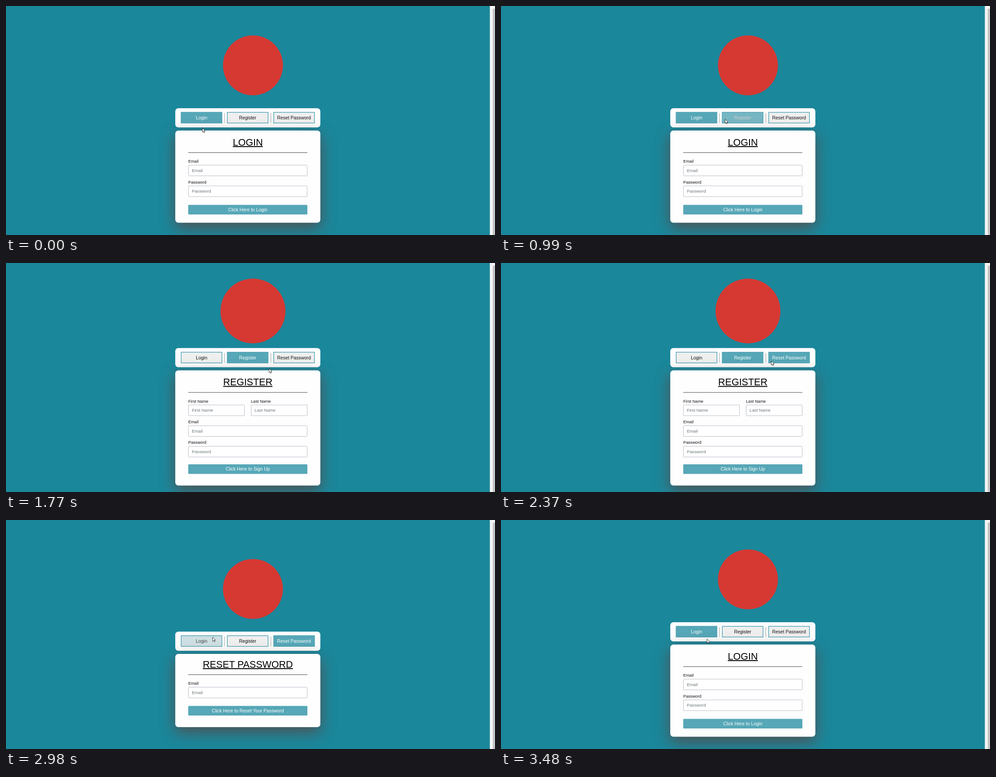
Write an HTML page that moves like this. It is 1092 px wide and 513 px high and loops after 3870 ms.

```html
<!DOCTYPE html>
<html lang="en">
<head>
<meta charset="utf-8">
<title>Login form</title>
<style>
  html, body { margin: 0; width: 100%; height: 100%; overflow: hidden; }
  body { position: relative; background: #1b879b; color: #111;
         font: 20.7px "Liberation Sans", Arial, sans-serif; }
  div, svg { position: absolute; box-sizing: border-box; white-space: nowrap; }
  /* Laid out at double size, so that half pixels stay exact. */
  #stage { left: 0; top: 0; width: 2184px; height: 1026px;
           transform: scale(.5); transform-origin: 0 0; }
  .scene { inset: 0; }
  .logo { border-radius: 50%; background: #d63832; }
  .panel { left: 756px; width: 648px; background: #fefefe; border-radius: 14px; }
  .nav { height: 86px; }
  .card { box-shadow: 0 22px 64px rgba(90, 70, 70, .85); }
  .tab { top: 17px; width: 185px; height: 51px; border: 3px solid #56a7b7;
         line-height: 46px; text-align: center; }
  .separator { top: 22px; width: 2px; height: 44px; background: #999; }
  .title { left: 0; width: 100%; font-size: 43px; line-height: 60px;
           text-align: center; text-decoration: underline; color: #000; }
  .rule { left: 58px; width: 532px; height: 2px; background: #444; }
  .label { font-size: 18.4px; line-height: 24px; }
  .field { height: 50px; padding-left: 14px; border: 2px solid #b9bcc9; border-radius: 3px;
           background: #fff; color: #6b7778; font-size: 19.4px; line-height: 45px; }
  .submit { left: 58px; width: 532px; height: 43px; border-radius: 3px;
            background: #56a7b7; color: #fff; line-height: 42px; text-align: center; }
  .track { left: 2161px; top: 0; width: 23px; height: 1026px; background: #f4f4f4; }
  .thumb { left: 13px; top: 12px; width: 10px; height: 1014px; background: #c4c4c4; }
  #cursor { left: 0; top: 0; overflow: visible; }
</style>
</head>
<body>
<div id="stage"></div>
<svg id="cursor" width="9" height="13">
  <path d="M.5 .5V9.6L2.6 7.7L4.1 11L5.6 10.3L4.2 7.2H7Z" fill="#fff" stroke="#111" stroke-width=".8"/>
</svg>
<script>
const LOOP = 3870;
const FADE = 200;
const CLICK_REGISTER = 1070, CLICK_RESET = 2410, CLICK_LOGIN = 3230;

// Row offsets are measured from the top of the card.
const scenes = [
  { top: 229, height: 206.5, logoY: 133, logoSize: 134, title: 'LOGIN', titleY: 26,
    fields: [['Email', 69], ['Password', 115.5]],
    submit: 'Click Here to Login', submitY: 166.5 },
  { top: 190.5, height: 258, logoY: 107.5, logoSize: 145, title: 'REGISTER', titleY: 26,
    fields: [['First Name', 69, 29, 126], ['Last Name', 69, 169, 126],
             ['Email', 115.5], ['Password', 161.5]],
    submit: 'Click Here to Sign Up', submitY: 210.5 },
  { top: 250, height: 164, logoY: 154.5, logoSize: 134, title: 'RESET PASSWORD', titleY: 23,
    fields: [['Email', 66]],
    submit: 'Click Here to Reset Your Password', submitY: 116.5 }
];

// Each fade is a start time and the level it leads to.
const tabs = [
  { text: 'Login', x: 12.5, start: 1, fades: [[CLICK_REGISTER, 0], [2960, 1]] },
  { text: 'Register', x: 115.5, start: 0, fades: [[890, 1], [CLICK_RESET, 0]] },
  { text: 'Reset Password', x: 219, start: 0, fades: [[1990, 1], [CLICK_LOGIN, 0]] }
];

// time, x, y of the pointer tip
const pointerPath = [
  [0, 438, 273], [460, 438, 273], [700, 466, 268], [900, 495, 256], [960, 500, 253],
  [1290, 500, 253], [1490, 546, 252], [1770, 587, 236], [1990, 600, 222], [2070, 603, 219],
  [2430, 603, 219], [2600, 522, 211], [2800, 488, 237], [2980, 461, 262], [3110, 459.5, 266],
  [LOOP, 459.5, 266]
];

function box(className, place, content = '') {
  const style = Object.entries(place).map(([key, value]) => `${key}:${value * 2}px`).join(';');
  return `<div class="${className}" style="${style}">${content}</div>`;
}

function fieldMarkup([name, y, left = 29, width = 266]) {
  return box('label', { left, top: y - 6 }, name) +
         box('field', { left, width, top: y + 8 }, name);
}

function sceneMarkup(s) {
  const nav = tabs.map(tab => box('tab', { left: tab.x }, tab.text)).join('') +
    [109.5, 213].map(left => box('separator', { left })).join('');
  const card = box('title', { top: s.titleY - 15 }, s.title) +
    box('rule', { top: s.titleY + 23 }) +
    s.fields.map(fieldMarkup).join('') +
    box('submit', { top: s.submitY }, s.submit);
  const size = s.logoSize;
  return box('scene', {},
    box('logo', { left: 551.5 - size / 2, top: s.logoY - size / 2, width: size, height: size }) +
    box('panel nav', { top: s.top }, nav) +
    box('panel card', { top: s.top + 50, height: s.height }, card));
}

const stage = document.getElementById('stage');
const cursor = document.getElementById('cursor');
stage.innerHTML = scenes.map(sceneMarkup).join('') + box('track', {}, box('thumb', {}));
const sceneNodes = [...stage.querySelectorAll('.scene')];

const mix = (a, b, k) => a + (b - a) * k;
const blend = (from, to, k) => `rgb(${from.map((c, i) => mix(c, to[i], k)).join()})`;

function tabLevel(tab, time) {
  return tab.fades.reduce((level, [start, goal]) => {
    const u = Math.min(1, Math.max(0, (time - start) / FADE));
    return mix(level, goal, 1 - (1 - u) ** 2.2);
  }, tab.start);
}

function pointerAt(time) {
  const i = pointerPath.findIndex(point => point[0] > time);
  const [t0, x0, y0] = pointerPath[i - 1];
  const [t1, x1, y1] = pointerPath[i];
  const k = (time - t0) / (t1 - t0);
  return [mix(x0, x1, k), mix(y0, y1, k)];
}

function sceneAt(time) {
  if (time < CLICK_REGISTER || time >= CLICK_LOGIN) return 0;
  return time < CLICK_RESET ? 1 : 2;
}

function draw() {
  const time = performance.now() % LOOP;
  const current = sceneAt(time);
  sceneNodes.forEach((node, i) => node.style.display = i === current ? '' : 'none');
  sceneNodes[current].querySelectorAll('.tab').forEach((node, i) => {
    const level = tabLevel(tabs[i], time);
    node.style.backgroundColor = blend([239, 239, 239], [86, 167, 183], level);
    node.style.color = blend([17, 17, 17], [255, 255, 255], level);
  });
  const [x, y] = pointerAt(time);
  cursor.style.transform = `translate(${x}px, ${y}px)`;
  requestAnimationFrame(draw);
}
draw();
</script>
</body>
</html>
```
